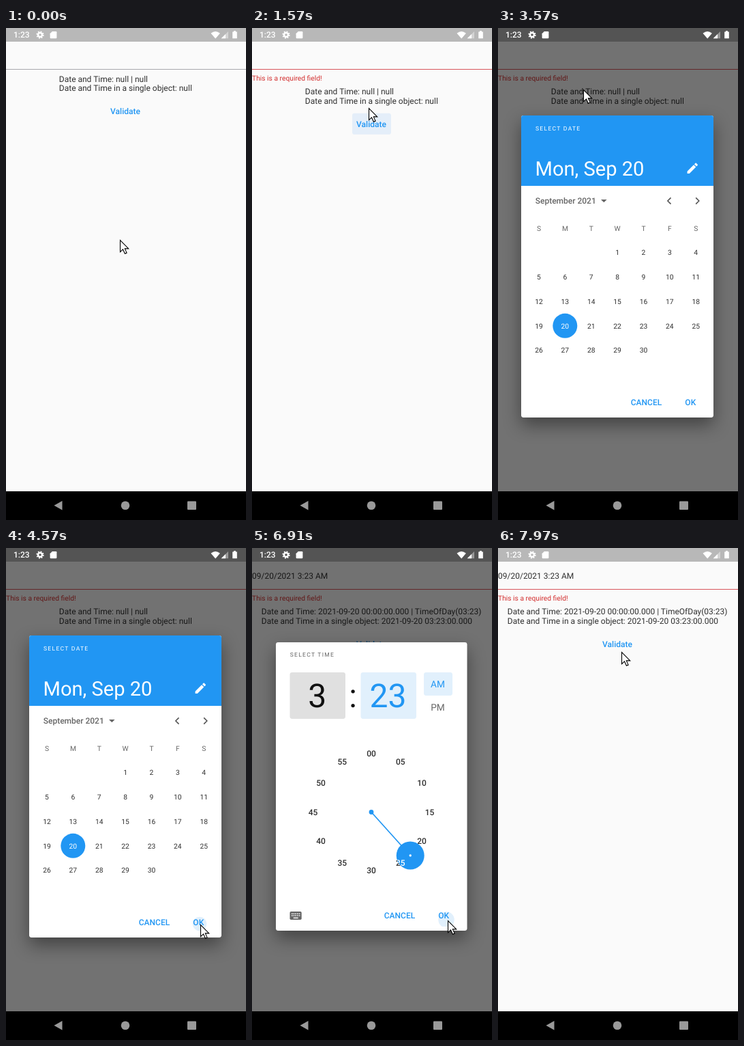
Animation, 352 px wide and 720 px high, one loop 8000 ms. Source, as an HTML page:

```html
<!DOCTYPE html>
<html lang="en">
<head>
<meta charset="utf-8">
<title>Date and time form field</title>
<style>
html, body { margin: 0; width: 100%; height: 100%; overflow: hidden; background: #fafafa; }
svg { display: block; width: 352px; height: 720px; }
text { font: 12px Roboto, sans-serif; fill: #303030; text-rendering: geometricPrecision; }
.mid { text-anchor: middle; }
.btn { font-weight: 500; fill: #2196f3; text-anchor: middle; }
.over { font-size: 8.56px; letter-spacing: 1.28px; }
.small { font-size: 10.27px; }
.big { font-size: 48px; text-anchor: middle; fill: #111; }
.half { font-size: 13.7px; text-anchor: middle; fill: #666; }
.sheet { fill: #fff; filter: drop-shadow(0 11px 13px rgba(0,0,0,.42)); }
.blue { fill: #2196f3; }
.tint { fill: #e1f0fc; }
.grey { fill: #666; }
.icon { fill: #fff; }
#ticks text { font-weight: 500; text-anchor: middle; }
#ticksOn text { font-weight: 500; text-anchor: middle; fill: #fff; }
</style>
</head>
<body>
<svg viewBox="0 0 352 720">
  <defs>
    <clipPath id="btnClip"><rect x="147" y="106" width="57" height="31" rx="3.4"/></clipPath>
    <clipPath id="rowClip"><rect y="20" width="352" height="60"/></clipPath>
    <clipPath id="dateOkClip"><rect x="255" y="532" width="55" height="31" rx="3.4"/></clipPath>
    <clipPath id="timeOkClip"><rect x="254" y="523" width="55" height="31" rx="3.4"/></clipPath>
    <clipPath id="knobClip"><circle id="knobHole" r="20.5"/></clipPath>
  </defs>

  <rect width="352" height="720" fill="#fafafa"/>
  <rect width="352" height="20" fill="#b8b8b8"/>

  <g clip-path="url(#rowClip)">
    <rect id="rowTint" y="20" width="352" height="60" fill-opacity=".05"/>
    <circle id="rowInk" cx="113" cy="59" fill-opacity=".12"/>
  </g>
  <text id="value" y="45">09/20/2021 3:23 AM</text>
  <rect id="line" y="60" width="352" height="1"/>
  <text id="error" class="small" y="76.7" style="fill:#d32f2f">This is a required field!</text>
  <g id="body">
    <text id="out1" y="78.7"></text>
    <text id="out2" y="92.2"></text>
    <g clip-path="url(#btnClip)"><circle id="btnInk" cx="174" cy="120" fill="#e4eef9"/></g>
    <text class="btn" x="175" y="126.3">Validate</text>
  </g>

  <rect id="barrier" width="352" height="678"/>

  <g id="date">
    <rect class="sheet" x="34" y="128" width="282" height="442" rx="3.4"/>
    <path class="blue" d="M34 231V131.4a3.4 3.4 0 0 1 3.4-3.4h275.2a3.4 3.4 0 0 1 3.4 3.4V231z"/>
    <text class="over" x="55" y="150" style="fill:#fff">SELECT DATE</text>
    <text x="54.5" y="216" style="font-size:29.1px;fill:#fff">Mon, Sep 20</text>
    <path transform="translate(275 195) scale(.856)" fill="#fff" d="M3 17.25V21h3.75L17.81 9.94l-3.75-3.75L3 17.25zM20.71 7.04c.39-.39.39-1.02 0-1.41l-2.34-2.34c-.39-.39-1.02-.39-1.41 0l-1.83 1.83 3.75 3.75 1.83-1.83z"/>
    <text class="grey" x="54.7" y="257.2" style="font-weight:500">September 2021</text>
    <path class="grey" d="M151 251h8.6l-4.3 4.3z"/>
    <path d="M253.5 248.4l-4.6 4.6 4.6 4.6M290.2 248.4l4.6 4.6-4.6 4.6" fill="none" stroke="#555" stroke-width="1.6"/>
    <circle class="blue" cx="98.3" cy="435.8" r="18"/>
    <g id="days"></g>
    <text class="btn" x="217.5" y="551.7">CANCEL</text>
    <g clip-path="url(#dateOkClip)"><circle id="dateInk" class="tint" cx="284" cy="550"/></g>
    <text class="btn" x="282.3" y="551.7">OK</text>
  </g>

  <g id="time">
    <rect class="sheet" x="35" y="138" width="280.5" height="422" rx="3.4"/>
    <text class="over grey" x="55.7" y="159.2">SELECT TIME</text>
    <rect id="hourBox" x="55.5" y="182" width="81.5" height="68" rx="3.4"/>
    <rect id="minBox" x="159.5" y="182" width="81.5" height="68" rx="3.4"/>
    <text id="hour" class="big" x="95.7" y="232.5"></text>
    <text class="big" x="148" y="232.5">:</text>
    <text id="min" class="big" x="199.5" y="232.5">23</text>
    <rect class="tint" x="252" y="182" width="42" height="34" rx="3.4"/>
    <text class="half" x="272.5" y="203.7" style="fill:#2196f3">AM</text>
    <text class="half" x="272.5" y="238">PM</text>
    <g id="ticks"></g>
    <line id="hand" x1="175" y1="386.5" stroke="#2196f3" stroke-width="1.7"/>
    <circle class="blue" cx="175" cy="386.5" r="3.4"/>
    <circle id="knob" class="blue" r="20.5"/>
    <circle id="dot" r="1.7" fill="#fff"/>
    <g id="ticksOn" clip-path="url(#knobClip)"></g>
    <rect class="grey" x="55.5" y="532" width="17.2" height="12" rx="1.7"/>
    <path d="M58 535.2h12.5M58 538h12.5" stroke="#fff" stroke-width="1.5" stroke-dasharray="1.6 1.1"/>
    <path d="M60.7 541.4h7" stroke="#fff" stroke-width="1.5"/>
    <text class="btn" x="216.5" y="542.3">CANCEL</text>
    <g clip-path="url(#timeOkClip)"><circle id="timeInk" class="tint" cx="285" cy="544"/></g>
    <text class="btn" x="281.2" y="542.3">OK</text>
  </g>

  <g class="icon">
    <text class="icon" x="11" y="14.2" style="font-weight:500">1:23</text>
    <g fill="none" stroke="#fff">
      <circle cx="50" cy="10" r="3" stroke-width="2.4"/>
      <circle cx="50" cy="10" r="4.7" stroke-width="1.9" stroke-dasharray="1.85 1.84"/>
    </g>
    <path d="M67.8 5h5.4q1.2 0 1.2 1.2v7.8q0 1.2-1.2 1.2h-7.4q-1.2 0-1.2-1.2V8.2z"/>
    <path d="M300.5 7.8q6.7-5.4 13.4 0L307.2 15.6z"/>
    <path d="M326 5v10.3h-10.3z" opacity=".4"/>
    <path d="M322 9v6.3h-6.3z"/>
    <path d="M334 4.2h3v1.2h1.8v9.8h-6.6V5.4h1.8z"/>
  </g>

  <rect y="678" width="352" height="42"/>
  <g fill="#999">
    <path d="M70.5 698.7L82.5 692v13.5z"/>
    <circle cx="175" cy="698.7" r="6.3"/>
    <rect x="266" y="692.5" width="13" height="12.5" rx="1"/>
  </g>

  <path id="cursor" d="M.5.5v17.2l4-3.8 2.9 6.4 2.7-1.2-2.8-6.2h5.4z" fill="#fff" stroke="#000" stroke-width="1.1"/>
</svg>

<script>
const $ = id => document.getElementById(id);
const set = (id, attrs) => { for (const k in attrs) $(id).setAttribute(k, attrs[k]); };
const fade = (id, v) => set(id, { opacity: v });
const say = (id, s) => { if ($(id).textContent !== s) $(id).textContent = s; };
const span = (t, a, b) => Math.min(1, Math.max(0, (t - a) / (b - a)));
const smooth = x => x * x * (3 - 2 * x);
const out = x => 1 - (1 - x) ** 2;

const label = (parent, x, y, s, cls) => {
  const e = document.createElementNS('http://www.w3.org/2000/svg', 'text');
  e.setAttribute('x', x);
  e.setAttribute('y', y);
  if (cls) e.setAttribute('class', cls);
  e.textContent = s;
  $(parent).append(e);
  return e;
};

// September 2021 starts on a Wednesday
const col = i => 60 + 38.37 * i;
[...'SMTWTFS'].forEach((d, i) => label('days', col(i), 296.6, d, 'mid small grey'));
for (let d = 1; d <= 30; d++) {
  const cell = d + 2;
  const e = label('days', col(cell % 7), 332.2 + 35.8 * Math.floor(cell / 7), d, 'mid small');
  if (d === 20) e.style.fill = '#fff';
}

const CX = 175, CY = 386.5, R = 85.5;
const polar = deg => {
  const a = deg * Math.PI / 180;
  return [CX + R * Math.sin(a), CY - R * Math.cos(a)];
};
const ticks = [];
for (let i = 0; i < 12; i++) {
  const [x, y] = polar(i * 30);
  for (const g of ['ticks', 'ticksOn']) ticks.push([label(g, x, y + 4.2, ''), i]);
}

// time, x, y of the pointer tip
const path = [
  [300, 167, 310], [1000, 171, 117], [1950, 171, 117], [2700, 114, 59],
  [3420, 114, 59], [4400, 285, 551], [4850, 285, 551], [5380, 263, 403],
  [5700, 263, 403], [6650, 287, 545], [7150, 287, 545], [7900, 181, 152]
];
function pointer(t) {
  if (t <= path[0][0]) return path[0].slice(1);
  for (let i = 1; i < path.length; i++) {
    const [a, ax, ay] = path[i - 1], [b, bx, by] = path[i];
    if (t < b) {
      const k = smooth(span(t, a, b));
      return [ax + (bx - ax) * k, ay + (by - ay) * k].map(Math.round);
    }
  }
  return path[path.length - 1].slice(1);
}

function ink(id, t, start, grown, r0, r1, gone) {
  set(id, {
    r: t < start ? 0 : r0 + (r1 - r0) * span(t, start, grown),
    opacity: 1 - span(t, gone, gone + 200)
  });
}

function drawForm(t) {
  const failed = t >= 1330, filled = t >= 6895;
  fade('value', +filled);
  fade('error', failed ? span(t, 1330, 1497) : 0);
  set('line', { fill: failed ? '#d9565c' : '#a8a8ac' });
  set('body', { transform: `translate(0 ${failed ? 18.8 : 0})` });
  for (const id of ['out1', 'out2']) set(id, { x: filled ? 13.8 : 77.8 });
  say('out1', 'Date and Time: ' + (filled ? '2021-09-20 00:00:00.000 | TimeOfDay(03:23)' : 'null | null'));
  say('out2', 'Date and Time in a single object: ' + (filled ? '2021-09-20 03:23:00.000' : 'null'));
  ink('btnInk', t, 1050, 1450, 5, 36, 1570);
  fade('rowTint', span(t, 2930, 3030) * (1 - span(t, 3200, 3400)));
  ink('rowInk', t, 2930, 3070, 8, 20, 3200);
}

function drawDial(t) {
  const minutes = t >= 5600;
  for (const [e, i] of ticks) {
    const s = minutes ? String(i * 5).padStart(2, '0') : String(i || 12);
    if (e.textContent !== s) e.textContent = s;
  }
  const deg = 30 + 60 * smooth(span(t, 5420, 5500)) + 48 * smooth(span(t, 5600, 5800));
  const [x, y] = polar(deg);
  set('hand', { x2: x, y2: y });
  for (const id of ['knob', 'knobHole', 'dot']) set(id, { cx: x, cy: y });
  const off = deg % 30;
  fade('dot', off > 3 && off < 27 ? 1 : 0);
  say('hour', t < 5460 ? '1' : '3');
  const on = '#e1f0fc', idle = '#e0e0e0';
  set('hourBox', { fill: minutes ? idle : on });
  set('minBox', { fill: minutes ? on : idle });
  $('hour').style.fill = minutes ? '#111' : '#2196f3';
  $('min').style.fill = minutes ? '#2196f3' : '#111';
}

function draw(t) {
  drawForm(t);
  const shown = (a, b, len) => out(span(t, a, a + 150)) * (1 - out(span(t, b, b + len)));
  fade('barrier', .54 * shown(3200, 6930, 150));
  fade('date', shown(3200, 4640, 100));
  fade('time', shown(4700, 6930, 150));
  ink('dateInk', t, 4500, 4660, 5, 17, 4700);
  ink('timeInk', t, 6810, 6990, 5, 17, 7000);
  drawDial(t);
  set('cursor', { transform: `translate(${pointer(t)})` });
}

const frame = () => {
  draw(performance.now() % 8000);
  requestAnimationFrame(frame);
};
frame();
</script>
</body>
</html>
```
